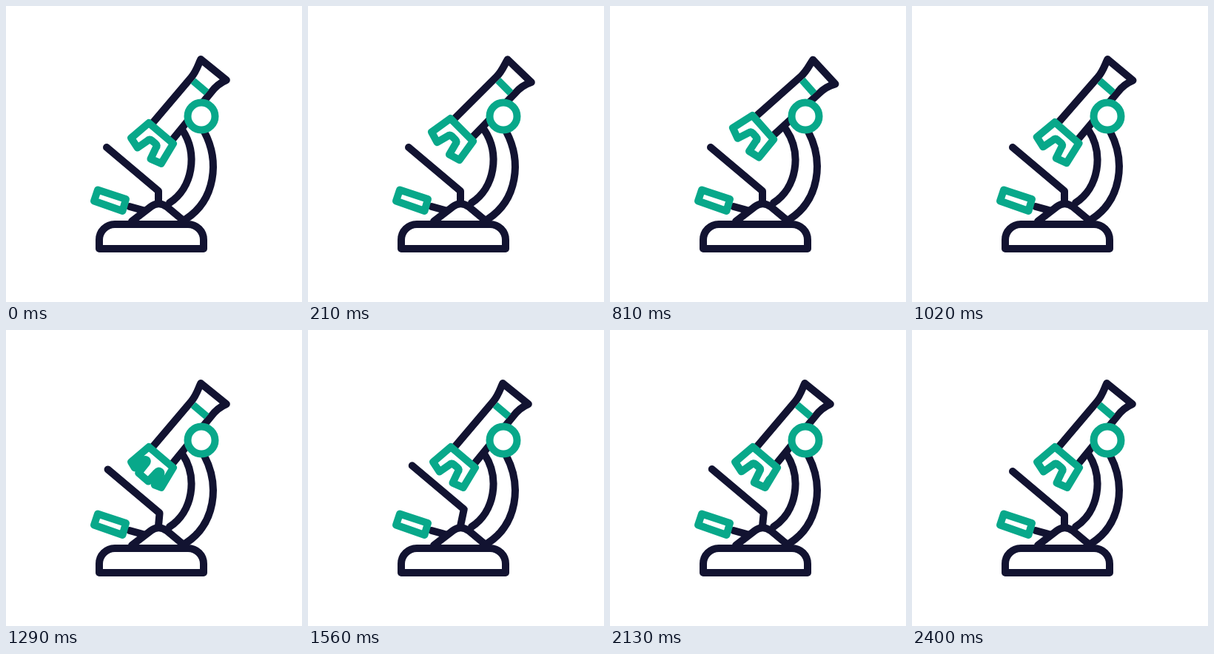
An HTML page that plays this animation: 400x400 px, repeating every 4.43 s.

```html
<!DOCTYPE html>
<html lang="en">
<head>
<meta charset="utf-8">
<title>Microscope</title>
<style>
html, body { margin: 0; width: 100%; height: 100%; overflow: hidden; background: #fff; }
svg { display: block; width: 100%; height: 100%; }
path, circle { fill: none; stroke: #121331; stroke-width: 10; stroke-linecap: round; stroke-linejoin: round; }
.green { stroke: #08a88a; }
.white { fill: #fff; }
</style>
</head>
<body>
<svg viewBox="0 0 400 400">
  <path d="M268 170C289 210 283 262 243 288M238 167C260 200 252 246 221 266"/>
  <path d="M167 271L185 276"/>
  <path class="green" d="M124 248.5L162 261L157.5 277L119 263.5Z"/>
  <path id="stage"/>
  <path class="white" d="M170 291L196 271Q206 263.5 217 271L241 291"/>
  <path class="white" d="M126 328V316A21 21 0 0 1 147 295H246A21 21 0 0 1 267 316V328Z"/>
  <g id="tube">
    <g transform="translate(193 158) rotate(40.3)">
      <path class="white" d="M4 -4V-84C4 -95 0 -103 -2 -111L42.5 -112C39 -105 36.5 -98 37.5 -86L39 -4"/>
      <path class="green" style="stroke-linecap: butt" d="M9 -82H33"/>
      <path id="lens" class="green white"/>
    </g>
  </g>
  <circle class="green white" cx="264" cy="149" r="18.5"/>
</svg>
<script>
const LOOP = 4430, STEP = 30, END = 2400;
const MID = 21.65; // centre line of the lens
const $ = id => document.getElementById(id);

// eased progress from 0 to 1 between two times
function ease(t, from, to) {
  const p = Math.min(1, Math.max(0, (t - from) / (to - from)));
  return (1 - Math.cos(Math.PI * p)) / 2;
}
const swing = (t, from, peak, to) => ease(t, from, peak) - ease(t, peak, to);

// left edge of a lens gap while it turns from far left (-1) to far right (1)
const STOPS = [-5, 4, 10, 30.3, 48.3];
function gapLeft(phase) {
  const x = (phase + 1) * 2, i = Math.min(3, Math.floor(x));
  return STOPS[i] + (STOPS[i + 1] - STOPS[i]) * (x - i);
}
const gapRight = phase => 2 * MID - gapLeft(-phase);
const rim = u => 31 + 5.5 * (1 - ((u - MID) / 26.65) ** 2);

function gap(phase) {
  const l = gapLeft(phase), r = gapRight(phase), inset = (r - l) * 0.14;
  const a = MID + (l - MID) * 0.92 + inset;
  const b = MID + (r - MID) * 0.92 - inset;
  const c = Math.min(4, (b - a) / 2);
  return `L${l} ${rim(l)}L${a} 19.5Q${a} 15.5 ${a + c} 15.5` +
    `L${b - c} 15.5Q${b} 15.5 ${b} 19.5L${r} ${rim(r)}`;
}

function lensPath(turn) {
  const gaps = turn > 0 && turn < 1 ? gap(turn - 1) + gap(turn) : gap(0);
  return `M0 0L-5 31${gaps}L48.3 31L43.3 0Z`;
}

function draw(now) {
  const t = Math.min(END, Math.floor((now % LOOP) / STEP) * STEP);
  const angle = 15 * swing(t, 0, 550, 1100);
  const lift = swing(t, 1050, 1720, 2390);
  const turn = t < 1650 ? ease(t, 1110, 1480) : ease(t, 1840, 2160);
  const dx = 5.5 * lift, dy = -9 * lift;

  $('tube').setAttribute('transform', `rotate(${angle} 264 149)`);
  $('lens').setAttribute('d', lensPath(turn));
  $('stage').setAttribute('d',
    `M${136 + dx} ${191 + dy}L${206 + dx} ${250 + dy}L206 265`);
}

const start = performance.now();
function tick() {
  draw(performance.now() - start);
  requestAnimationFrame(tick);
}
tick();
</script>
</body>
</html>
```
